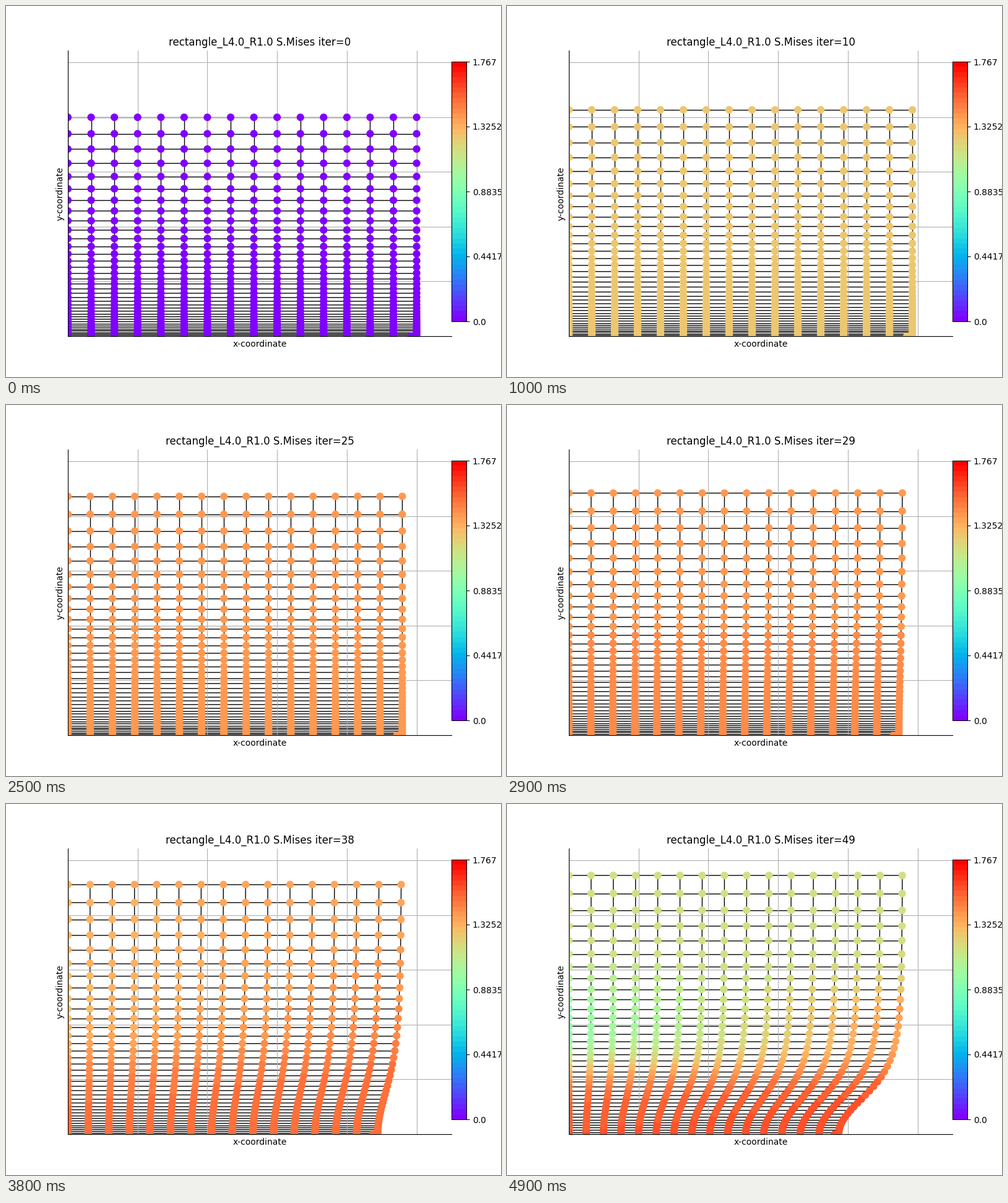
These frames come from a looping animation (800 by 600 pixels, 5 s). A matplotlib script:

```python
import numpy as np
import matplotlib.pyplot as plt
from matplotlib.animation import FuncAnimation
from matplotlib.cm import ScalarMappable
from matplotlib.collections import LineCollection
from matplotlib.colors import Normalize

STEPS = 50
LENGTH = 4.0
COLUMNS, ROWS = 15, 37
RATIO = 0.93            # geometric refinement of rows towards the bottom
STRAIN_STEP = 0.003795
NECK_STRETCH = 1.0956   # uniform stretch at which necking starts
NECK_STEP = 26
MAX_STRESS = 1.767
NOTCH = 0.984

s = np.linspace(0, 1, COLUMNS + 1)[None, :]
rank = np.arange(ROWS, -1, -1)
z = (LENGTH * (1 - (1 - RATIO**rank) / (1 - RATIO**ROWS)))[:, None]


def neck_width(step):
    t = step - 33
    return 1.443 * np.exp(-0.0655 * t + 0.00068 * t * t)


def mesh(step):
    """Node positions: uniform stretch first, then a neck at the bottom."""
    stretch = 1 + STRAIN_STEP * max(step - 1, 0)
    uniform = min(stretch, NECK_STRETCH)
    width = neck_width(max(step, NECK_STEP))

    def shape_integral(height):
        return height / np.sqrt(1 + (height / width) ** 2)

    depth = LENGTH * (stretch - uniform) / shape_integral(LENGTH)
    shape = (1 + (z / width) ** 2) ** -1.5
    radius = (uniform + depth * shape) ** -0.5
    if step > 1:
        radius = radius + 0.0015
    inward = 0.0155 * depth * shape * np.tanh(3.5 * s) * (1 - s**10)
    x = radius * s - inward
    y = uniform * z + depth * shape_integral(z) + 0 * s
    x[0, -1] *= NOTCH
    return x, y


def stress(step):
    """Stress relative to the maximum at every node."""
    if step == 0:
        return np.zeros((ROWS + 1, COLUMNS + 1))
    if step <= NECK_STEP:
        strain = np.log(1 + STRAIN_STEP * (step - 0.7))
        return np.full((ROWS + 1, COLUMNS + 1), strain**0.1)
    t = step - NECK_STEP
    width = neck_width(step)
    top = 0.7875 - 0.1375 * (t / 23) ** 2.6
    bottom = 0.7875 + 0.123 * (1 - np.exp(-t / 15))
    centre = 0.384 + 0.78 * width
    level = top + (bottom - top) / (1 + np.exp((z - centre) / (0.27 * width)))
    tilt = 0.25 * (max(step - 30, 0) / 19) ** 1.5
    band = np.exp(-(((z - 1.02 - 0.85 * width) / (1.22 * width)) ** 2))
    return level + tilt * band * (s - 0.5)


def edges(x, y):
    """Every element edge once, as a separate segment."""
    p = np.stack([x, y], axis=-1)
    across = np.stack([p[:, :-1], p[:, 1:]], axis=2).reshape(-1, 2, 2)
    along = np.stack([p[:-1], p[1:]], axis=2).reshape(-1, 2, 2)
    return np.concatenate([across, along])


plt.rcParams["font.family"] = "DejaVu Sans"
fig, ax = plt.subplots(figsize=(8, 6), dpi=100)
ax.set_xlim(0, 1.1)
ax.set_ylim(0, 5.22)
ax.set_xticks(np.arange(0, 1.1, 0.2))
ax.set_yticks(range(6))
ax.tick_params(length=0, labelbottom=False, labelleft=False)
ax.grid(True)
ax.spines[["top", "right"]].set_visible(False)
ax.set_xlabel("x-coordinate")
ax.set_ylabel("y-coordinate")
title = ax.set_title("")

cmap = plt.get_cmap("rainbow", 50)
norm = Normalize(0, MAX_STRESS)
bar_ax = fig.add_axes([0.9, 0.15, 0.03, 0.7])
bar = fig.colorbar(ScalarMappable(norm, cmap), cax=bar_ax,
                   ticks=np.linspace(0, MAX_STRESS, 5))
bar.ax.set_yticklabels(["0.0", "0.4417", "0.8835", "1.3252", "1.767"])

x0, y0 = mesh(0)
lines = LineCollection(edges(x0, y0), colors="black", linewidths=1, zorder=1)
ax.add_collection(lines, autolim=False)
nodes = ax.scatter(x0.ravel(), y0.ravel(), c=np.zeros(x0.size), s=60,
                   cmap=cmap, norm=norm, zorder=2)


def update(step):
    x, y = mesh(step)
    lines.set_segments(edges(x, y))
    nodes.set_offsets(np.column_stack([x.ravel(), y.ravel()]))
    nodes.set_array(MAX_STRESS * stress(step).ravel())
    title.set_text(f"rectangle_L4.0_R1.0 S.Mises iter={step}")
    return lines, nodes, title


anim = FuncAnimation(fig, update, frames=STEPS, interval=100, repeat=True,
                     repeat_delay=0)
plt.show()
```
